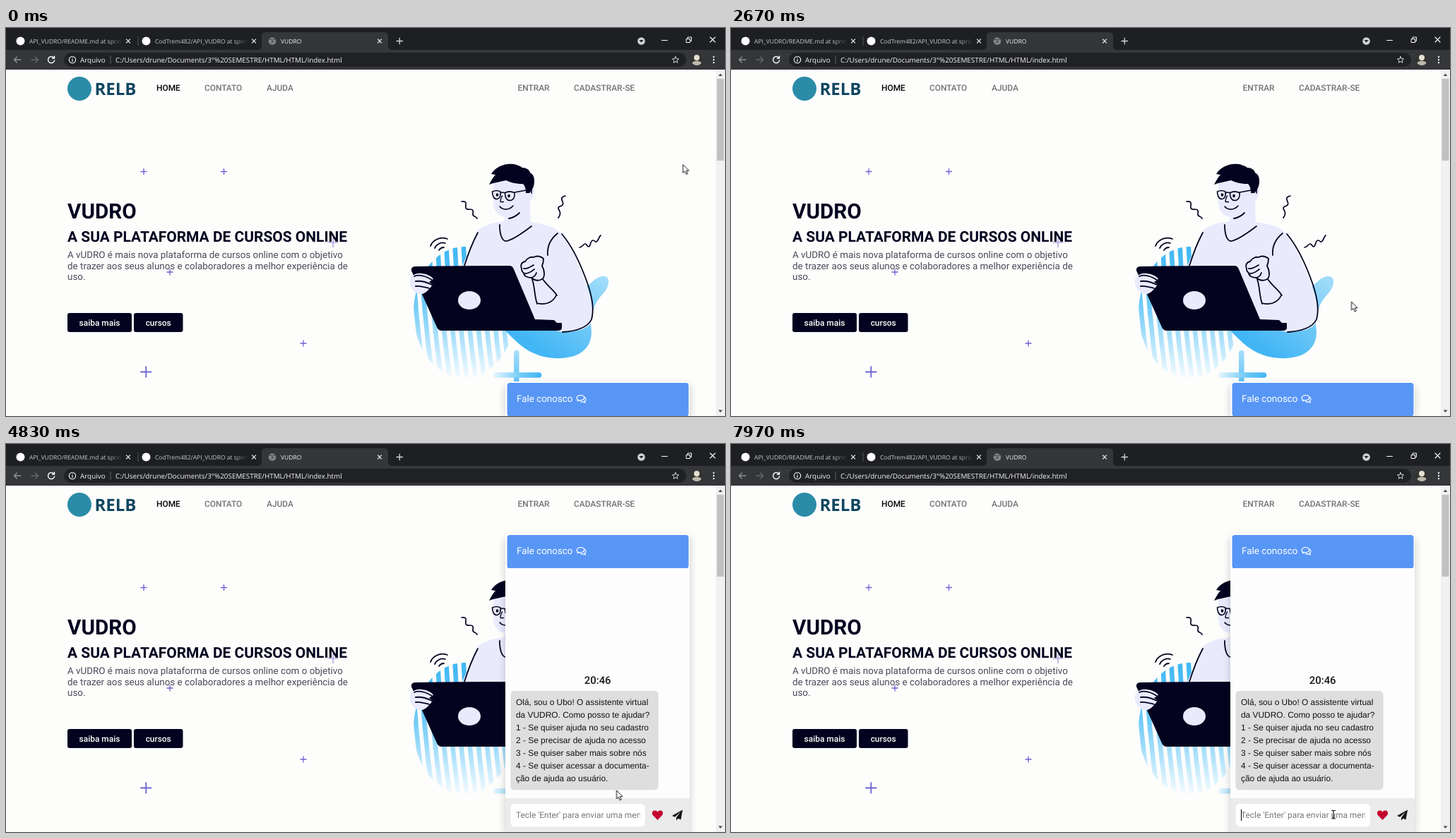
An HTML page for the animation above (8000 ms loop, 1018 by 550 pixels).

```html
<!DOCTYPE html>
<html lang="pt-BR">
<head>
<meta charset="utf-8">
<title>Cursos online</title>
<style>
  html, body { margin: 0; width: 100%; height: 100%; overflow: hidden; background: #fdfdfc; }
  #stage { position: relative; width: 1018px; height: 550px; overflow: hidden; }
  svg { position: absolute; display: block; left: 0; }
  text { white-space: pre; text-rendering: geometricPrecision; }

  .ui { font-family: "Open Sans", "Noto Sans", sans-serif; font-size: 8.5px; fill: #c6c9cd; }
  .bar { font-size: 9.9px; }
  .bright { fill: #f1f3f4; }
  .page { font-family: Roboto, sans-serif; font-size: 11.92px; }
  .mid { font-weight: 500; }
  .bold { font-weight: 700; }
  .arial { font-family: "Liberation Sans", Arial, sans-serif; font-size: 11.92px; fill: #111; }
  .line { fill: none; stroke-linecap: round; stroke-linejoin: round; }
  .ink { stroke: #03031f; stroke-width: 1.8; }

  .chat {
    position: absolute; left: 707px; bottom: 0; width: 261px; height: 49px;
    background: #fdfdfd; border-radius: 5px 5px 0 0;
    box-shadow: 0 5px 12px rgba(0, 0, 0, .2);
    animation: open 8s step-end infinite;
  }
  .reveal { position: absolute; inset: 49px 0 0; overflow: hidden; }
  .reveal svg { bottom: 0; }

  .cursor { animation: move 8s ease-in-out infinite; }
  .arrow { animation: arrow 8s step-end infinite; }
  .hand { animation: hand 8s step-end infinite; }
  .beam { animation: beam 8s step-end infinite; }
  .caret { animation: caret 8s step-end infinite; }

  @keyframes open {
    0% { height: 49px; }
    53.75% { height: 98px; }
    54.25% { height: 208px; }
    54.625% { height: 278px; }
    55% { height: 335px; }
    55.375% { height: 380px; }
    55.875% { height: 420px; }
    56.25%, 100% { height: 423px; }
  }
  @keyframes move {
    0%, 3% { transform: translate(958.5px, 193.5px); }
    20%, 23.75% { transform: translate(880.5px, 237px); }
    32.5%, 36% { transform: translate(878.5px, 388px); }
    45%, 56% { transform: translate(870px, 519px); }
    60%, 62.5% { transform: translate(864.5px, 491px); }
    69%, 100% { transform: translate(853px, 525px); }
  }
  @keyframes arrow {
    0% { visibility: visible; }
    43% { visibility: hidden; }
    57.5% { visibility: visible; }
    66%, 100% { visibility: hidden; }
  }
  @keyframes hand {
    0% { visibility: hidden; }
    43% { visibility: visible; }
    57.5%, 100% { visibility: hidden; }
  }
  @keyframes beam {
    0% { visibility: hidden; }
    66%, 100% { visibility: visible; }
  }
  @keyframes caret {
    0% { visibility: hidden; }
    83% { visibility: visible; }
    89.625% { visibility: hidden; }
    96.25%, 100% { visibility: visible; }
  }
</style>
</head>
<body>
<div id="stage">
  <svg width="1018" height="550" viewBox="0 0 1018 550">
    <defs>
      <linearGradient id="fadeTab"><stop offset=".86" stop-color="#fff"/><stop offset="1" stop-color="#fff" stop-opacity="0"/></linearGradient>
      <mask id="tabA"><path d="M30 8h135v20h-135z" fill="url(#fadeTab)"/></mask>
      <mask id="tabB"><path d="M208 8h135v20h-135z" fill="url(#fadeTab)"/></mask>
      <linearGradient id="stripeFade" gradientUnits="userSpaceOnUse" x1="0" y1="310" x2="0" y2="496">
        <stop offset="0" stop-color="#3fb7f3"/><stop offset=".45" stop-color="#71cbf7"/><stop offset="1" stop-color="#f4fbff"/>
      </linearGradient>
      <linearGradient id="blobFill" gradientUnits="userSpaceOnUse" x1="850" y1="350" x2="770" y2="465">
        <stop offset="0" stop-color="#a5defa"/><stop offset="1" stop-color="#42b6f5"/>
      </linearGradient>
      <linearGradient id="plusH" gradientUnits="userSpaceOnUse" x1="690" y1="0" x2="758" y2="0">
        <stop offset="0" stop-color="#e4f5fe"/><stop offset=".6" stop-color="#6dc8f6"/><stop offset="1" stop-color="#3fb5f2"/>
      </linearGradient>
      <linearGradient id="plusV" gradientUnits="userSpaceOnUse" x1="0" y1="457" x2="0" y2="500">
        <stop offset="0" stop-color="#a8dffa"/><stop offset="1" stop-color="#62c4f6"/>
      </linearGradient>
      <clipPath id="disc"><ellipse cx="649" cy="403" rx="72" ry="93"/></clipPath>
      <clipPath id="avatar"><circle cx="978" cy="45" r="8"/></clipPath>
    </defs>

    <!-- Browser frame -->
    <rect width="1018" height="32" fill="#1e1f22"/>
    <rect y="31" width="1018" height="28" fill="#35363a"/>
    <path d="M356 31q6 0 6-6V12q0-6 6-6h167q6 0 6 6v13q0 6 6 6z" fill="#35363a"/>
    <rect x="82" y="35" width="881" height="20" rx="10" fill="#202124"/>
    <g class="ui">
      <circle cx="20.5" cy="18.5" r="6" fill="#fff"/>
      <text x="33" y="21.8" mask="url(#tabA)">API_VUDRO/README.md at sprint</text>
      <circle cx="198.500" cy="18.5" r="6" fill="#fff"/>
      <text x="211" y="21.8" mask="url(#tabB)">CodTrem482/API_VUDRO at sprint</text>
      <text class="bright" x="389" y="21.8">VUDRO</text>
      <text class="bar bright" x="105" y="48.5">Arquivo</text>
      <text class="bar bright" x="155" y="48.5">C:/Users/drune/Documents/3°%20SEMESTRE/HTML/HTML/index.html</text>
    </g>
    <circle cx="377" cy="18.5" r="5.3" fill="#85888c"/>
    <path class="line" d="M373 16l4 1 1 3-3 1M379 14v2l3 1" stroke="#4a4b4f" stroke-width="1.3"/>
    <g class="line" stroke="#d5d7da" stroke-width="1.3">
      <path d="M170.500 16l5 5m0-5l-5 5M348.500 16l5 5m0-5l-5 5M526.500 16l5 5m0-5l-5 5"/>
      <path d="M553 18.500h8.500M557.250 14.250v8.500"/>
      <path d="M928.500 17.500h8M997 13l7 7m0-7l-7 7" stroke="#fff" stroke-width="1.1"/>
      <path d="M963.500 15.500h5v5h-5zM965 15v-2h5.500v5.500h-2" stroke="#fff" stroke-width="1"/>
      <path d="M21 45H11.500m4-4l-4 4 4 4" stroke="#909295"/>
      <path d="M36 45h9.500m-4-4l4 4-4 4" stroke="#65676b"/>
      <path d="M68 42.500a4.600 4.600 0 1 0 .6 3.600M68.500 40v3h-3" stroke="#f1f3f4" stroke-width="1.5"/>
      <circle cx="94" cy="45" r="4.7" stroke="#f1f3f4" stroke-width="1.1"/>
      <path d="M94 44.800v2.400M94 42.700v.1" stroke="#f1f3f4"/>
      <path d="M148 39.500v11" stroke="#5f6368" stroke-width="1"/>
      <path d="M187 12.500v12" stroke="#56585c" stroke-width="1"/>
      <path d="M948 40.500l1.300 3 3.200.3-2.400 2.200.7 3.200-2.800-1.700-2.800 1.700.7-3.200-2.400-2.200 3.200-.3z" stroke-width="1"/>
    </g>
    <circle cx="899.5" cy="18.5" r="5.3" fill="#d0d2d5"/>
    <path d="M896.500 17h6l-3 3.500z" fill="#1e1f22"/>
    <g clip-path="url(#avatar)">
      <path d="M968 36h20v18h-20z" fill="#34332f"/>
      <circle cx="978" cy="42" r="4" fill="#e5dfd2"/>
      <ellipse cx="978" cy="52" rx="7.5" ry="5.5" fill="#bdb7aa"/>
    </g>
    <g fill="#e8eaed"><circle cx="1002" cy="41" r="1.2"/><circle cx="1002" cy="45" r="1.2"/><circle cx="1002" cy="49" r="1.2"/></g>

    <!-- Page -->
    <rect y="59" width="1018" height="491" fill="#fdfdfc"/>
    <rect x="1005" y="59" width="13" height="491" fill="#f1f1f1"/>
    <rect x="1006.5" y="72" width="10" height="116" fill="#c1c1c1"/>
    <path d="M1008.500 68l3-3.500 3 3.500zM1008.500 541.500l3 3.500 3-3.500z" fill="#505050"/>

    <g class="line" stroke="#6e62d2" stroke-width="1.3">
      <path d="M191 203.500h8m-4-4v8M304.500 203.500h8m-4-4v8M228 346h8m-4-4v8M417 447h8m-4-4v8"/>
      <path d="M456.500 304h13m-6.500-6.500v13" stroke="#b0a8e6" stroke-width="1.6"/>
      <path d="M191 487.500h14.500m-7.250-7.250v14.500" stroke-width="1.8"/>
    </g>

    <circle cx="104" cy="86" r="17" fill="#2b8ca8"/>
    <text x="125.5" y="95" font-family="'Noto Sans', 'Open Sans', sans-serif" font-size="24" font-weight="600" fill="#10465f">RELB</text>
    <g class="page">
      <g class="mid" fill="#747474">
        <text x="213" y="89" fill="#050505">HOME</text>
        <text x="281" y="89">CONTATO</text>
        <text x="369" y="89">AJUDA</text>
        <text x="724.5" y="89">ENTRAR</text>
        <text x="804" y="89">CADASTRAR-SE</text>
      </g>
      <g class="bold" fill="#03031f">
        <text x="87" y="270" font-size="29.7">VUDRO</text>
        <text x="87" y="302.7" font-size="20.95">A SUA PLATAFORMA DE CURSOS ONLINE</text>
      </g>
      <g font-size="13.41" fill="#484b58">
        <text x="87" y="326">A vUDRO é mais nova plataforma de cursos online com o objetivo</text>
        <text x="87" y="341.7">de trazer aos seus alunos e colaboradores a melhor experiência de</text>
        <text x="87" y="357.3">uso.</text>
      </g>
      <rect x="87" y="404" width="91" height="27" rx="3" fill="#03031f"/>
      <rect x="181" y="404" width="69.5" height="27" rx="3" fill="#03031f"/>
      <g class="mid" fill="#fff" text-anchor="middle">
        <text x="132.5" y="421.5">saiba mais</text>
        <text x="215.7" y="421.5">cursos</text>
      </g>
    </g>

    <!-- Illustration -->
    <g clip-path="url(#disc)"><g id="stripes" class="line" stroke="url(#stripeFade)" stroke-width="6.6"></g></g>
    <path d="M704 426c14 14 28 30 48 37 18 7 44 7 59-1 16-9 20-24 17-40 0-17 5-33 17-45 7-7 10-17 7-22-4-6-13-3-20 3-9 8-20 17-36 26z" fill="url(#blobFill)"/>
    <g class="line" stroke-width="7.5">
      <path d="M722.800 460.500V530" stroke="url(#plusV)"/>
      <path d="M694 492h60.500v.01" stroke="url(#plusH)"/>
    </g>

    <path d="M668 287c8-7 18-10 30-12h44c16 2 34 6 43 15 14 16 26 46 36 72 7 18 12 38 9 52-4 13-22 17-43 17L640 400l4-58z" fill="#e9ebfd"/>
    <path d="M691 215c-2 13-2 27 0 39 2 9 8 13 17 14l-7 10c2 15 5 23 11 23 11-3 21-11 31-20l-1-34c3-4 6-10 6-17 0-5-3-8-6-8-10-7-32-12-51-7z" fill="#e9ebfd"/>
    <path d="M684 222c3-6 6-11 9-14l-6-1c4-7 13-13 23-14 8-1 16 1 21 5 6 0 10 3 11 7 5 3 6 7 6 12 0 8-3 13-7 17h-5c0-6-1-10-4-13-9 0-18-2-24-5-8 2-17 3-24 6z" fill="#03031f"/>
    <g class="line ink">
      <path d="M688.500 232c4-2 8-2 11.500 0 1 6-1 10-5 10.500-4 0-6.500-4.500-6.500-10.500zM706.500 233.500c4-2 9-2 13.500 0 1 6.500-2 11-6.500 11-5 0-7-4.500-7-11zM700 234q3-2 6.500 0M720 233l16-3" stroke-width="1.6"/>
      <path d="M702.500 238c-2 4-3.500 7-2 8.500h4M699 253c4 5 13 6 19-1M739 227c4-1 6 2 5 7" stroke-width="1.5"/>
      <path d="M712 270c6-1 11-4 15-8"/>
      <path d="M699 279c0 13 3 24 10 23 12-3 24-13 35-21M668 290c-8 15-14 31-19 47"/>
      <path d="M781 291c-10 8-15 19-14 31M787 292c17 20 29 49 37 72 5 15 9 35 5 49-5 11-21 17-41 18"/>
      <path d="M645 246c8-1 6 3 6 6-1 6 3 5 6 5 6 0 4 4 4 7 0 4 4 2 6 6M792 238c-6 1-6 4-4 8 2 5-1 6-4 7-4 2-1 4 0 7 2 5-1 7-2 9M812 311c4 0 5-5 8-5s2 4 5 4 2-9 6-9 2 3 5 2 3-7 6-9" stroke-width="1.7"/>
      <path d="M601 309c3-8 13-14 24-10M607 312c3-6 9-9 15-7M613 315c2-3 4-4 7-4"/>
    </g>
    <g fill="#03031f">
      <ellipse cx="695.5" cy="236.500" rx="1.8" ry="2.200"/><ellipse cx="712" cy="238" rx="1.8" ry="2.200"/>
      <path d="M574 344q-1-5 5-6c45-1 90-1 134-1q4 0 6 5l30 71 27 1 4 4h7v7q0 4-6 4H617q-5 0-7-5z"/>
    </g>
    <ellipse cx="656" cy="386" rx="16" ry="13" fill="#e9ebfd"/>
    <g fill="#e9ebfd">
      <path d="M744 354l6 38c12 1 22-2 30-7l-20-30z"/>
      <path class="ink" stroke-linejoin="round" d="M730 341c-2-5 0-9 5-10 3-5 8-7 12-6 5-3 11-1 14 2 0 5-1 8-2 10 3 6 4 12 2 17-4 5-12 5-17 0-7 0-11-3-11-7-2-1-3-3-3-6z"/>
      <path d="M572 356c4-7 10-9 17-8 8 1 14 4 16 8l-6 4 5 4-4 5c-5 6-10 9-15 8-8-2-14-10-13-21z"/>
    </g>
    <g class="line ink" stroke-width="1.7">
      <path d="M733 341c5 1 9-2 14-5M735 348c6 0 9-3 13-6M744 354c4-1 6-4 7-7M745 356c4 12 3 24 7 35M760 356c6 9 15 15 20 23M752 390c10 3 22 0 27-11"/>
      <path d="M578 352c7-3 17 0 25 5M580 359c7-1 15 1 23 5M580 366c6-1 12 1 19 3"/>
    </g>
  </svg>

  <div class="chat">
    <svg class="page" width="261" height="49" viewBox="707 501 261 49">
      <rect x="709.5" y="503" width="257" height="47.5" rx="4" fill="#5896f6"/>
      <text x="723" y="530.3" font-size="13.41" fill="#fff">Fale conosco</text>
      <g class="line" stroke="#fff" stroke-width="1.2">
        <path d="M810 527.500c-3-2-2.500-6.500 3.500-7 6 0 7 5.500 2 7-1.500.4-3 .4-4 .1l-2.500 1.200z"/>
        <path d="M819 523c2.500 1.500 2.500 4.500.3 6l1 2-2.800-1.100c-1.500.3-3 0-4-.7"/>
      </g>
    </svg>
    <div class="reveal">
      <svg width="261" height="374" viewBox="707 176 261 374">
        <text class="page mid" x="837.7" y="340" style="font-size: 14.9px" text-anchor="middle" fill="#17191c">20:46</text>
        <rect x="714.5" y="350" width="209" height="140.5" rx="5" fill="#dedede"/>
        <g class="arial">
          <text x="722" y="370">Olá, sou o Ubo! O assistente virtual</text>
          <text x="722" y="388">da VUDRO. Como posso te ajudar?</text>
          <text x="722" y="406">1 - Se quiser ajuda no seu cadastro</text>
          <text x="722" y="424">2 - Se precisar de ajuda no acesso</text>
          <text x="722" y="442">3 - Se quiser saber mais sobre nós</text>
          <text x="722" y="460">4 - Se quiser acessar a documenta-</text>
          <text x="722" y="478">ção de ajuda ao usuário.</text>
        </g>
        <rect x="707" y="502" width="261" height="48" fill="#ebebeb"/>
        <rect x="714.5" y="510" width="190.5" height="32.5" rx="6" fill="#fff"/>
        <clipPath id="field"><path d="M721 510h176.500v32h-176.500z"/></clipPath>
        <text class="page" x="722" y="530" fill="#777" clip-path="url(#field)">Tecle 'Enter' para enviar uma mensagem</text>
        <path class="caret" d="M722.500 518v16" stroke="#000"/>
        <path d="M922.500 533l-6.300-6.400c-2.200-2.400-1.400-6.300 1.400-7 2-.5 3.700.3 4.900 1.800 1.200-1.500 2.900-2.300 4.900-1.800 2.800.7 3.600 4.600 1.400 7z" fill="#c4062f"/>
        <path d="M958 518.500L943 527l4 1.800 8-7.300-6 8.300v3.900l2.500-2.900 4 1.700z" fill="#151515"/>
      </svg>
    </div>
  </div>

  <svg width="1018" height="550" viewBox="0 0 1018 550">
    <g class="cursor" stroke-linejoin="round">
      <path class="arrow" d="M0 0V12L2.700 9.500 4.700 13.900 6.700 13 4.800 8.800H8.500z" fill="#fff" stroke="#111"/>
      <path class="hand" d="M-1.500 10V1.200C-1.500-.7 1.300-.7 1.300 1.200V6c.8-1 2.300-.6 2.500.3.900-.6 2.100-.1 2.200.8 1-.4 1.900.2 1.900 1.200V12c0 2-.9 2.700-1.200 4.700H-.5C-1 14-3.500 12-4.600 9.800c-.7-1.400.9-2.300 1.900-1.300z" fill="#fff" stroke="#111"/>
      <path class="beam line" d="M-2.500-5.500h2L0-5l.5-.5h2M0-5V5.500M-2.500 6h2l.5-.5.5.5h2" stroke="#111" stroke-width="1.2"/>
    </g>
  </svg>
</div>
<script>
  const stripes = document.getElementById("stripes");
  for (let x = 562; x < 730; x += 12.2) {
    const line = document.createElementNS(stripes.namespaceURI, "path");
    line.setAttribute("d", `M${x} 300q4 100 18 200`);
    stripes.append(line);
  }
</script>
</body>
</html>
```
